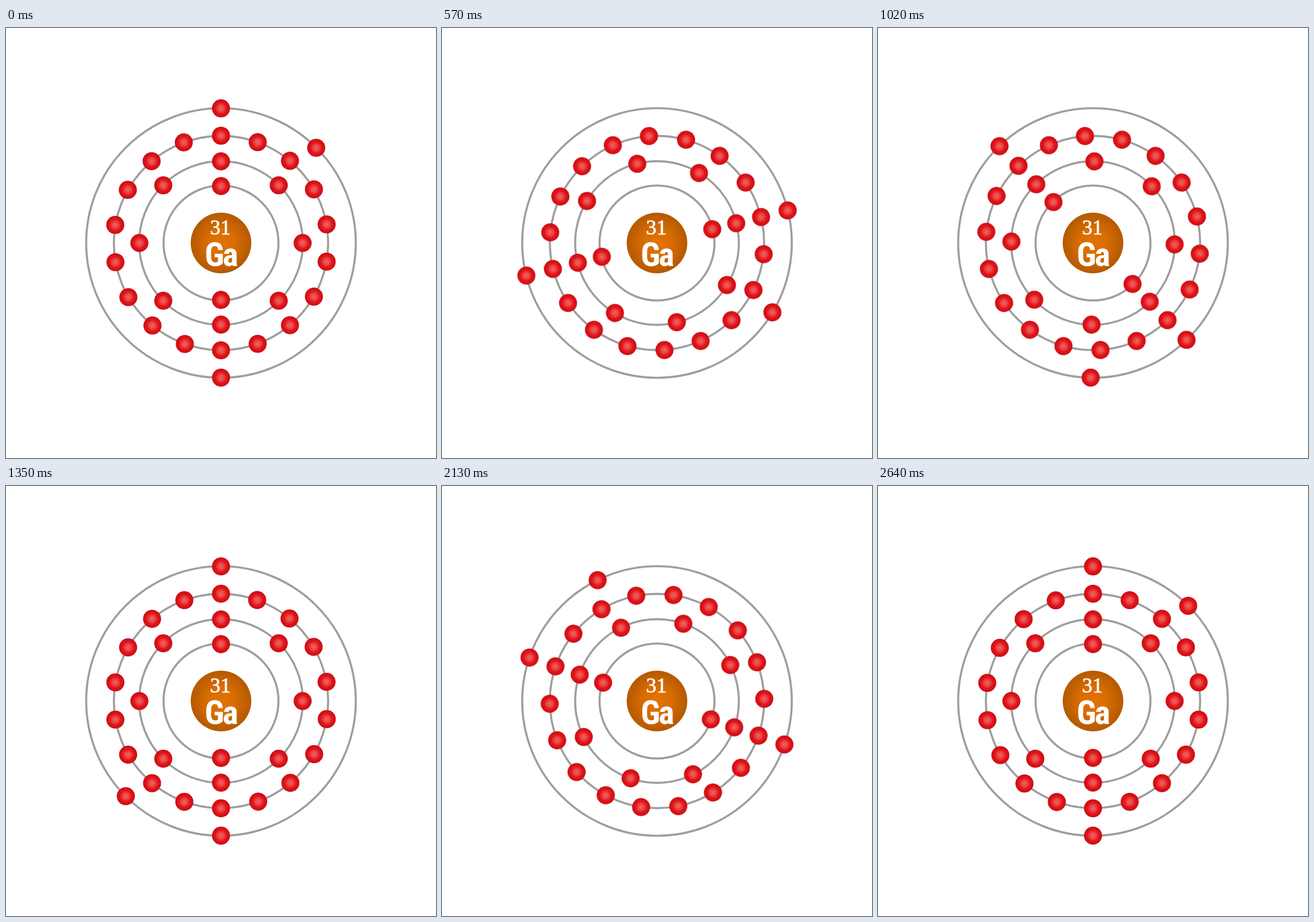
An HTML page for the animation above (2.67 s loop, 748 by 748 pixels).

```html
<!DOCTYPE html>
<html lang="en">
<head>
<meta charset="utf-8">
<title>Electron shells</title>
<style>
  html, body { margin: 0; width: 100%; height: 100%; overflow: hidden; background: #fff; }
  svg { display: block; width: 100%; height: 100%; }
  .ring { fill: none; stroke: #9e9e9e; stroke-width: 3.6; }
  .electron { fill: url(#red); }
  text { fill: #fff; text-anchor: middle; }
  .number { font: 36px "Liberation Serif", serif; stroke: #fff; stroke-width: .8; }
  .symbol {
    font: bold 58px "Roboto Condensed", Roboto, sans-serif;
    font-stretch: condensed;
    letter-spacing: -3px;
  }

  /* Two half turns of 45 and 43 ticks, 30 ms each, then one tick of rest */
  #electrons { transform-origin: 0 0; animation: spin 2670ms -1ms infinite; }
  @keyframes spin {
    0% { transform: rotate(0deg); animation-timing-function: steps(45); }
    50.5618% { transform: rotate(180deg); animation-timing-function: steps(43); }
    98.8764%, 100% { transform: rotate(360deg); }
  }
</style>
</head>
<body>
<svg viewBox="-374 -374 748 748">
  <defs>
    <radialGradient id="red">
      <stop offset="0" stop-color="#f2625f"/>
      <stop offset=".3" stop-color="#ec4a4b"/>
      <stop offset=".65" stop-color="#dd1419"/>
      <stop offset=".85" stop-color="#d80f14"/>
      <stop offset="1" stop-color="#c50d11"/>
    </radialGradient>
    <radialGradient id="orange">
      <stop offset="0" stop-color="#e27304"/>
      <stop offset=".45" stop-color="#d96d02"/>
      <stop offset="1" stop-color="#b45900"/>
    </radialGradient>
  </defs>
  <g id="rings"></g>
  <circle r="52.7" fill="url(#orange)"/>
  <text class="number" x="-1" y="-15">31</text>
  <text class="symbol" x="-.5" y="40">Ga</text>
  <g id="electrons"></g>
</svg>
<script>
  const even = n => Array.from({ length: n }, (_, i) => i * 360 / n);

  const shells = [
    { ring: 100, orbit: 99, angles: even(2) },
    { ring: 142.4, orbit: 142, angles: even(8) },
    { ring: 186.4, orbit: 186.6, angles: even(18).map(a => a > 180 ? a - 0.3 : a) },
    { ring: 234.5, orbit: 234.2, angles: [0, 45, 180] }
  ];

  function addCircle(parent, cls, r, x = 0, y = 0) {
    const c = document.createElementNS("http://www.w3.org/2000/svg", "circle");
    const attrs = { class: cls, r, cx: x, cy: y };
    for (const key in attrs) c.setAttribute(key, attrs[key]);
    parent.append(c);
  }

  const rings = document.getElementById("rings");
  const electrons = document.getElementById("electrons");

  for (const { ring, orbit, angles } of shells) {
    addCircle(rings, "ring", ring);
    for (const deg of angles) {
      const a = deg * Math.PI / 180;
      addCircle(electrons, "electron", 15.7, orbit * Math.sin(a), -orbit * Math.cos(a));
    }
  }
</script>
</body>
</html>
```
